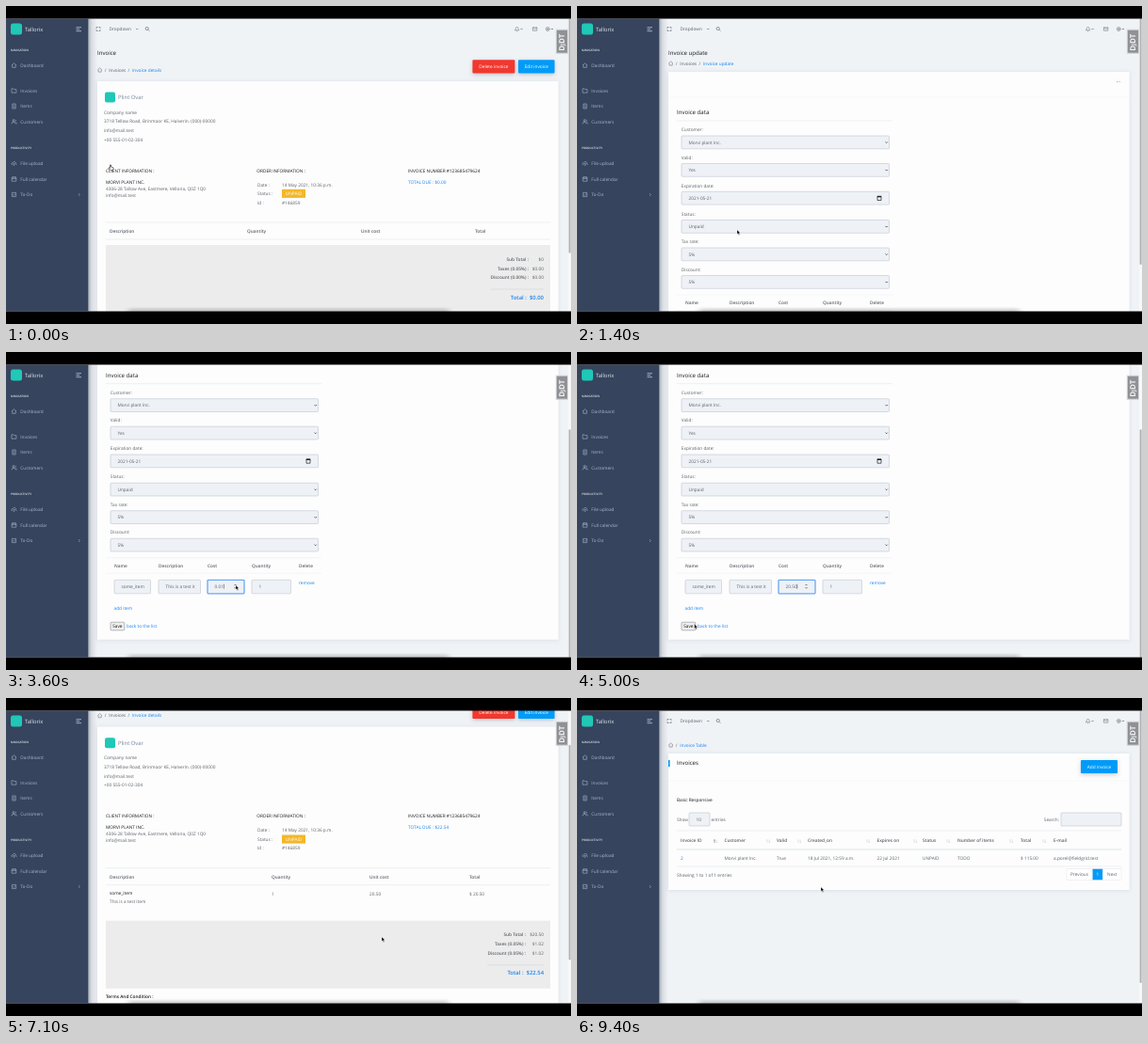
These frames come from a looping animation (600x338 px, 9.5 s). An HTML page:

```html
<!DOCTYPE html>
<html lang="en">
<head>
<meta charset="utf-8">
<title>Invoice walkthrough</title>
<style>
  html, body { margin: 0; width: 100%; height: 100%; overflow: hidden; background: #000; }
  svg { display: block; width: 600px; height: 338px; font-family: "Open Sans", "Noto Sans", sans-serif; }
  text { white-space: pre; text-rendering: geometricPrecision; }
</style>
</head>
<body>
<svg id="stage" viewBox="0 0 600 338"></svg>
<script>
const LOOP = 9500, STEP = 100, TOP = 13.5, VIEW = 311;
const GREY = '#5d6169', DARK = '#17191d', BLUE = '#1682f3', TEAL = '#1fc8b7', LINE = '#e3e6ea';
const BRAND = 'Tallorix', CUSTOMER = 'Morvi plant Inc.', MAIL = 'info@mail.test';
const stage = document.getElementById('stage');

// y is the visual middle of a line of text
function text(x, y, str, { size = 4.75, fill = GREY, weight = 400, anchor = 'start' } = {}) {
  return `<text x="${x}" y="${y + size * 0.36}" font-size="${size}" fill="${fill}" font-weight="${weight}" text-anchor="${anchor}">${str}</text>`;
}
const rect = (x, y, w, h, fill, extra = '') =>
  `<rect x="${x}" y="${y}" width="${w}" height="${h}" fill="${fill}" ${extra}/>`;
const path = (d, stroke = GREY, width = 0.6, fill = 'none') =>
  `<path d="${d}" stroke="${stroke}" stroke-width="${width}" fill="${fill}"/>`;
const rule = (x1, x2, y, color = LINE, width = 0.6) => path(`M${x1} ${y}H${x2}`, color, width);
const caret = (x, y, s = 1.1, color = GREY) => path(`M${x - s} ${y - s / 2}l${s} ${s}l${s} ${-s}`, color, 0.7);
const link = (x, y, str) => text(x, y, str, { fill: BLUE });
const heading = (x, y, str) => text(x, y, str, { size: 6.1, fill: DARK });

// value along [time, ...values] points
function along(keys, t) {
  const i = keys.findIndex(k => k[0] > t);
  if (i < 0) return keys[keys.length - 1].slice(1);
  if (i === 0) return keys[0].slice(1);
  const a = keys[i - 1], b = keys[i];
  const p = (t - a[0]) / (b[0] - a[0]), e = p * p * (3 - 2 * p);
  return a.slice(1).map((v, n) => v + (b[n + 1] - v) * e);
}
const typed = (str, t, from, to) =>
  str.slice(0, Math.max(0, Math.ceil(str.length * Math.min(1, (t - from + STEP) / (to - from + STEP)))));
const within = (t, a, b) => t >= a && t < b;

const POINTER = [
  [0, 111, 169], [200, 111, 169], [700, 563, 63], [900, 563, 63], [1400, 170, 238],
  [1700, 125, 271], [2000, 125, 271], [2200, 135, 248], [2500, 135, 248], [2600, 185, 249],
  [3000, 185, 249], [3200, 244, 248], [3700, 244, 248], [4000, 137, 288], [4700, 137, 288],
  [5200, 118, 290], [5400, 118, 290], [5700, 263.5, 262.5], [6300, 263.5, 262.5], [7100, 399, 254],
  [7300, 440, 200], [8100, 517, 63], [8600, 517, 63], [9300, 128, 143], [9400, 259, 201]
];
const SCROLL = [
  [1400, 0], [1700, 59], [1800, 59], [2000, 88.3], [5200, 88.3], [5300, 0],
  [5500, 0], [5700, 31.7], [5900, 49.3], [7100, 49.3], [7300, 0]
];

const card = (y, h) => rect(97, y, 489.5, h, '#fdfdfd', 'filter="url(#soft)"');

function button(x, y, w, h, str, fill) {
  return rect(x, y, w, h, fill, 'rx=".8" filter="url(#lift)"') +
    text(x + w / 2, y + h / 2, str, { fill: '#fff', anchor: 'middle' });
}

function field(x, y, w, h, str, focus) {
  return rect(x, y, w, h, '#eef1f6', `rx=".8" stroke="${focus ? '#6aa9f5' : '#c0c5cf'}" stroke-width="${focus ? 1.3 : 0.6}"`) +
    text(x + 7.5, y + h / 2, str);
}

function crumbs(y, ...names) {
  let x = 109.2, out = path(`M97.3 ${y}l2.3 -2.2l2.3 2.2M98 ${y - 0.4}v2.5h3.2v-2.5`, GREY, 0.5);
  names.forEach((name, i) => {
    out += text(x - 4.5, y, '/') + (i === names.length - 1 ? link(x, y, name) : text(x, y, name));
    x += 24.7;
  });
  return out;
}

function topbar() {
  return path('M96 24v-1.5h1.5M98.5 22.5h1.5v1.5M100 25v1.5h-1.5M97.5 26.5h-1.5v-1.5', GREY, 0.6) +
    text(109.5, 24.5, 'Dropdown') + caret(139.3, 24.5) +
    '<circle cx="149.7" cy="24" r="1.6" fill="none" stroke="#555" stroke-width=".6"/>' + path('M150.9 25.2l1.5 1.5') +
    path('M540.3 25.8q1 -.8 1 -2.1a1.3 1.3 0 0 1 2.6 0q0 1.3 1 2.1zM542 26.8h1.2', GREY, 0.5) + caret(547.5, 24.5) +
    path('M559.4 22.8h4.4v3.4h-4.4zl2.2 1.9l2.2 -1.9', GREY, 0.5) +
    '<circle cx="575.3" cy="24.5" r="1.9" fill="none" stroke="#555" stroke-width=".8" stroke-dasharray="1 .4"/>' +
    '<circle cx="575.3" cy="24.5" r=".7" fill="#555"/>' + caret(580, 24.5);
}

function details(t) {
  const filled = t > 3000, dy = filled ? 32 : 0;
  const cols = filled ? [110, 282, 386, 492] : [110, 256, 377, 498];
  const end = filled ? 552 : 555;
  const bold = { weight: 600 }, dark = { fill: DARK }, right = { anchor: 'end' };
  let out = heading(97, 50, 'Invoice') + crumbs(68, 'Invoices', 'Invoice details') +
    button(495.4, 57.2, 45, 14.2, 'Delete invoice', within(t, 8000, 8700) ? '#f0170e' : '#f1382d') +
    button(544, 57.2, 38.6, 14.2, 'Edit invoice', '#069bf8') +
    card(80, 303 + dy) + rect(105, 91.5, 11, 11, TEAL, 'rx="2"') +
    text(119, 97, 'Plint Ovar', { size: 5.9, fill: '#75849a' });
  ['Company name', '3718 Tellow Road, Brinmoor KE, Halverin. (000)-00000', MAIL, '+00 555-01-02-304']
    .forEach((s, i) => out += text(104, 113 + i * 9.7, s));
  out += text(106, 175, 'CLIENT INFORMATION :', dark) + text(266.3, 175, 'ORDER INFORMATION :', dark) +
    text(427, 175, 'INVOICE NUMBER #123685479624', dark) +
    text(106, 187, CUSTOMER.toUpperCase(), dark) +
    text(106, 194, '4306-28 Tallow Ave, Eastmere, Velloria, Q0Z 1Q0') + text(106, 201, MAIL) +
    link(427, 187, `TOTAL DUE : ${filled ? '$22.54' : '$0.00'}`) +
    text(267, 190, 'Date :') + text(293, 190, '14 May 2021, 10:36 p.m.') +
    text(267, 199.5, 'Status :') + rect(293, 194.8, 25, 9.1, '#f4b728') +
    text(305.5, 199.5, 'UNPAID', { fill: '#fff', anchor: 'middle' }) +
    text(267, 209, 'Id :') + text(293, 209, '#146859') +
    rule(106, 578, 230) + rule(106, 578, 248);
  ['Description', 'Quantity', 'Unit cost', 'Total'].forEach((s, i) => out += text(cols[i], 239.3, s, bold));
  if (filled) {
    out += text(110, 257, 'some_item', dark) + text(110, 266, 'This is a test item');
    ['1', '20.50', '$ 20.50'].forEach((s, i) => out += text(cols[i + 1], 258, s));
  }
  out += rect(106, 254 + dy, 472, 72, '#ececec');
  const sums = filled ? ['$20.50', '$1.02', '$1.02'] : ['$0', '$0.00', '$0.00'];
  ['Sub Total :', 'Taxes (0.05%) :', `Discount (${filled ? '0.05' : '0.00'}%) :`].forEach((s, i) => {
    const y = 269 + dy + i * 9.8;
    out += text(end, y, s, { weight: 600, anchor: 'end' }) + text(571, y, sums[i], right);
  });
  return out + rule(filled ? 511 : 515, 571, 301 + dy, '#d4d6d9') +
    text(571, 309.5 + dy, `Total :  ${filled ? '$22.54' : '$0.00'}`, { size: 5.9, fill: BLUE, weight: 600, anchor: 'end' }) +
    text(106, 335 + dy, 'Terms And Condition :', { fill: DARK, weight: 600 });
}

function update(t) {
  const row = t >= 1900, dy = row ? 0 : -29;
  let out = heading(97, 50, 'Invoice update') + crumbs(61, 'Invoices', 'Invoice update') +
    card(70, 324 + dy) + text(572.5, 79, '…', { size: 6 }) + rule(97, 586, 97, '#f0f1f3') +
    heading(106, 113, 'Invoice data') + rule(106, 335, 122);
  const inputs = [
    ['Customer:', CUSTOMER, 131.5, 138], ['Valid:', 'Yes', 161, 167.5], ['Expiration date:', '2021-05-21', 191, 197.3],
    ['Status:', 'Unpaid', 221, 227.5], ['Tax rate:', '5%', 250.5, 257], ['Discount:', '5%', 280, 286.5]
  ];
  inputs.forEach(([label, value, ly, y], i) => {
    out += text(110.8, ly, label) + field(111, y, 220.5, 13.8, value);
    out += i === 2
      ? path(`M319 ${y + 5.2}h4v4h-4z`, '#222', 0.7) + rect(318.8, y + 4.5, 4.4, 1.5, '#222')
      : caret(328.7, y + 7, 1.1, '#222');
  });
  ['Name', 'Description', 'Cost', 'Quantity', 'Delete'].forEach((s, i) =>
    out += text([115, 162, 214, 261, 311][i], 315.5, s, { weight: 600 }));
  out += rule(106, 335, 307, '#eceef1') + rule(106, 335, 323.5, '#eceef1');
  if (row) {
    const focus = t < 2100 || t >= 5200 ? -1 : t < 2600 ? 0 : t < 3100 ? 1 : 2;
    const cost = t < 3400 ? '' : t < 4100 ? '0.01' : typed('20.50', t, 4200, 4600);
    const values = [typed('some_item', t, 2100, 2500), typed('This is a test item', t, 2600, 3000).slice(0, 17), cost, '1'];
    [[115, 38.5], [162, 44.5], [214, 39], [261, 41.5]].forEach(([x, w], i) =>
      out += field(x, 330.6, w, 14.5, values[i], i === focus));
    if (focus === 2) {
      out += caret(243.5, 339, 1, '#333') + path('M242.5 336.4l1 -1l1 1', '#333', 0.7);
      if (t % 1000 < 700) out += path(`M${222 + cost.length * 2.35} 335v5`, '#222', 0.5);
    }
    out += link(311, 334, 'remove');
  }
  return out + link(114.5, 360.3 + dy, 'add item') +
    rect(111, 375.5, 14.8, 8.6, t >= 5100 ? '#d5d5d5' : '#efefef', `rx="1" stroke="#777" stroke-width=".5" transform="translate(0 ${dy})"`) +
    text(118.3, 379.8 + dy, 'Save', { fill: '#111', anchor: 'middle' }) + link(128, 379.8 + dy, 'back to the list');
}

function list() {
  const cols = [110, 156.5, 212, 245, 318.5, 367, 404, 471, 506];
  const heads = ['Invoice ID', 'Customer', 'Valid', 'Created_on', 'Expires on', 'Status', 'Number of items', 'Total', 'E-mail'];
  const cells = ['2', CUSTOMER, 'True', '18 Jul 2021, 12:59 a.m.', '22 Jul 2021', 'UNPAID', 'TODO', '$ 115.00', 'a.porel@fieldgrid.test'];
  let out = crumbs(50, 'Invoice Table') + card(59, 145) + rect(97, 66, 1.6, 7, '#069bf8') +
    heading(106, 69, 'Invoices') + button(535, 66, 39, 14, 'Add invoice', '#069bf8') + rule(97, 586, 88, '#f0f1f3') +
    text(106, 108, 'Basic Responsive', { fill: DARK }) +
    text(106, 129, 'Show') + field(119, 122, 22, 14, '10') + text(142.5, 129, 'entries') +
    text(512, 129, 'Search:', { anchor: 'end' }) + field(514, 122, 64, 14, '') +
    rule(106, 578, 141) + rule(106, 578, 161, '#dfe2e7', 1) + rule(106, 578, 179);
  heads.forEach((s, i) => {
    out += text(cols[i], 151.2, s, { weight: 600 }) + text(cols[i], 170, cells[i], { fill: i ? GREY : BLUE });
    if (i < 8) {
      const x = [146, 202, 235, 308, 358, 393, 460, 495][i];
      out += path(`M${x} 154v-3.4m-.7 .8l.7 -.8l.7 .8`, i ? '#c8ccd2' : '#555', 0.5) +
        path(`M${x + 2.3} 150.6v3.4m-.7 -.8l.7 .8l.7 -.8`, '#c8ccd2', 0.5);
    }
  });
  out += text(106, 188.5, 'Showing 1 to 1 of 1 entries');
  [['Previous', 520, 27], ['1', 547.3, 11], ['Next', 558.5, 19.5]].forEach(([s, x, w], i) =>
    out += rect(x, 181.5, w, 12, i === 1 ? '#069bf8' : '#fff', `stroke="${LINE}" stroke-width=".5"`) +
      text(x + w / 2, 187.5, s, { anchor: 'middle', fill: i === 1 ? '#fff' : GREY }));
  return out;
}

function sidebar() {
  const pale = '#a9b7d0', cap = { size: 3.1, fill: '#e6ebf3', weight: 600 };
  const icon = d => path(d, pale, 0.6);
  let out = rect(87, TOP, 10, VIEW, 'url(#edge)') + rect(0, TOP, 87.3, VIEW, '#36445d') +
    rect(5, 18.5, 12, 12, TEAL, 'rx="2.5"') + text(20, 24.5, BRAND, { size: 5.8, fill: '#e3e9f2' }) +
    path('M74.5 22.7h5.5M74.5 24.7h3.7M74.5 26.7h5.5', '#cfd8e6', 0.7) +
    text(5, 47, 'NAVIGATION', cap) + text(5, 151, 'PRODUCTIVITY', cap);
  [['Dashboard', 63], ['Invoices', 90], ['Items', 106.5], ['Customers', 123], ['File upload', 167.5],
    ['Full calendar', 184], ['To-Do', 200.5]].forEach(([s, y]) => out += text(15.3, y, s, { fill: pale }));
  return out + icon('M6 63l2.5 -2.2l2.5 2.2M6.7 62.5v2.8h3.6v-2.8') +
    icon('M6 92.2v-4.4h1.8l.7 .8h2.4v3.6z') +
    icon('M6.8 104h3.4v5h-3.4zM7.6 105.8h1.8M7.6 107.3h1.8') +
    icon('M6 125.3q0 -2 2 -2t2 2M8 122.6a1 1 0 1 1 .1 0M10 120.8q1 .9 0 1.8M10.4 123.5q1 .5 1 1.8') +
    icon('M7 169q-1.3 -.3 -1 -1.6q.3 -.9 1.3 -.8q.7 -1.5 2.2 -1q1.2 .6 1 1.8q1 .6 .2 1.6M8.6 170v-2.8m-1 1l1 -1l1 1') +
    icon('M6.2 182h4.6v4.2h-4.6zM6.2 183.4h4.6M7.5 181.2v1.2M9.5 181.2v1.2') +
    icon('M6.4 198.4h4.2v4.2h-4.2zM7.4 200.5l.9 .9l1.7 -2') + icon('M77 199.1l1.4 1.4l-1.4 1.4');
}

function debugHandle() {
  return rect(584.3, 25.2, 12.2, 25, '#8f9195', 'stroke="#d3d5d8" stroke-width="1"') +
    '<text transform="translate(593.4 47.8) rotate(-90)" font-size="8" font-weight="700" fill="#f3f4f5">' +
    'D<tspan font-size="6">J</tspan>DT</text>';
}

function pointer(t) {
  const [x, y] = along(POINTER, t);
  const hand = t < 300 || within(t, 600, 900) || within(t, 1700, 2000) || within(t, 8000, 8700);
  const shape = hand
    ? path('M-.6 0q.6 -.6 1.1 0v2l2 .5q.7 .3 .5 1.2l-.5 2h-2.7l-2 -2.5q.2 -.7 1 -.2l.6 .5z', '#111', 0.6, '#fff')
    : path('M0 0v4.6l1.1 -1l.8 1.8l.8 -.4l-.8 -1.7h1.5z', '#fff', 0.3, '#000');
  return `<g transform="translate(${x} ${y})">${shape}</g>`;
}

function tooltip(x, w, str) {
  return rect(x - w / 2, 43, w, 12, '#0a0a0a', 'rx="2"') + path(`M${x - 2} 55h4l-2 2z`, 'none', 0, '#0a0a0a') +
    text(x, 49, str, { fill: '#fff', anchor: 'middle' });
}

function scrollbar(y, height) {
  const r = VIEW / height;
  return rect(597, TOP, 3, VIEW, '#f8f8f8') + rect(597.6, TOP + y * r, 2, VIEW * r, '#b0b2b5', 'rx="1"');
}

const DEFS = `<defs>
  <filter id="soft" x="-20%" y="-20%" width="140%" height="140%"><feDropShadow dx="0" dy=".5" stdDeviation="2" flood-color="#45506a" flood-opacity=".15"/></filter>
  <filter id="lift" x="-20%" y="-50%" width="140%" height="220%"><feDropShadow dx="0" dy="1.5" stdDeviation="2" flood-color="#45506a" flood-opacity=".3"/></filter>
  <filter id="blur" x="-10%" y="-200%" width="120%" height="500%"><feGaussianBlur stdDeviation="3 1.2"/></filter>
  <linearGradient id="edge"><stop stop-color="#36445d" stop-opacity=".4"/><stop offset=".4" stop-color="#36445d" stop-opacity=".12"/><stop offset="1" stop-color="#36445d" stop-opacity="0"/></linearGradient>
</defs>`;

function scene(t) {
  const [y] = along(SCROLL, t);
  const [page, height] = t < 900 ? [details, 388]
    : t < 5300 ? [update, t < 1900 ? 370 : 399]
    : t < 8800 ? [details, 423] : [list, 334];
  const overDelete = within(t, 8100, 8700);
  return DEFS + rect(0, 0, 600, 338, '#f0f3f6') +
    `<g transform="translate(0 ${-y})">${topbar()}${page(t)}</g>` +
    rect(130, 321.5, 340, 5, '#000', 'opacity=".16" filter="url(#blur)"') +
    sidebar() + scrollbar(y, height) + debugHandle() +
    (within(t, 700, 900) ? tooltip(563, 34, 'Edit invoice') : '') +
    (overDelete ? tooltip(517.7, 40, 'Delete invoice') +
      rect(0, 319.5, 142, 6, '#565b64', 'rx="1"') +
      text(2, 322.2, '127.0.0.1:8000/invoices/delete/invoice/146859/', { size: 3.6, fill: '#d5d8dd' }) : '') +
    pointer(t) + rect(0, 0, 600, TOP, '#000') + rect(0, TOP + VIEW, 600, 14, '#000');
}

let shown = -1;
function frame() {
  const t = Math.floor(performance.now() % LOOP / STEP) * STEP;
  if (t !== shown) stage.innerHTML = scene(shown = t);
  requestAnimationFrame(frame);
}
frame();
</script>
</body>
</html>
```
